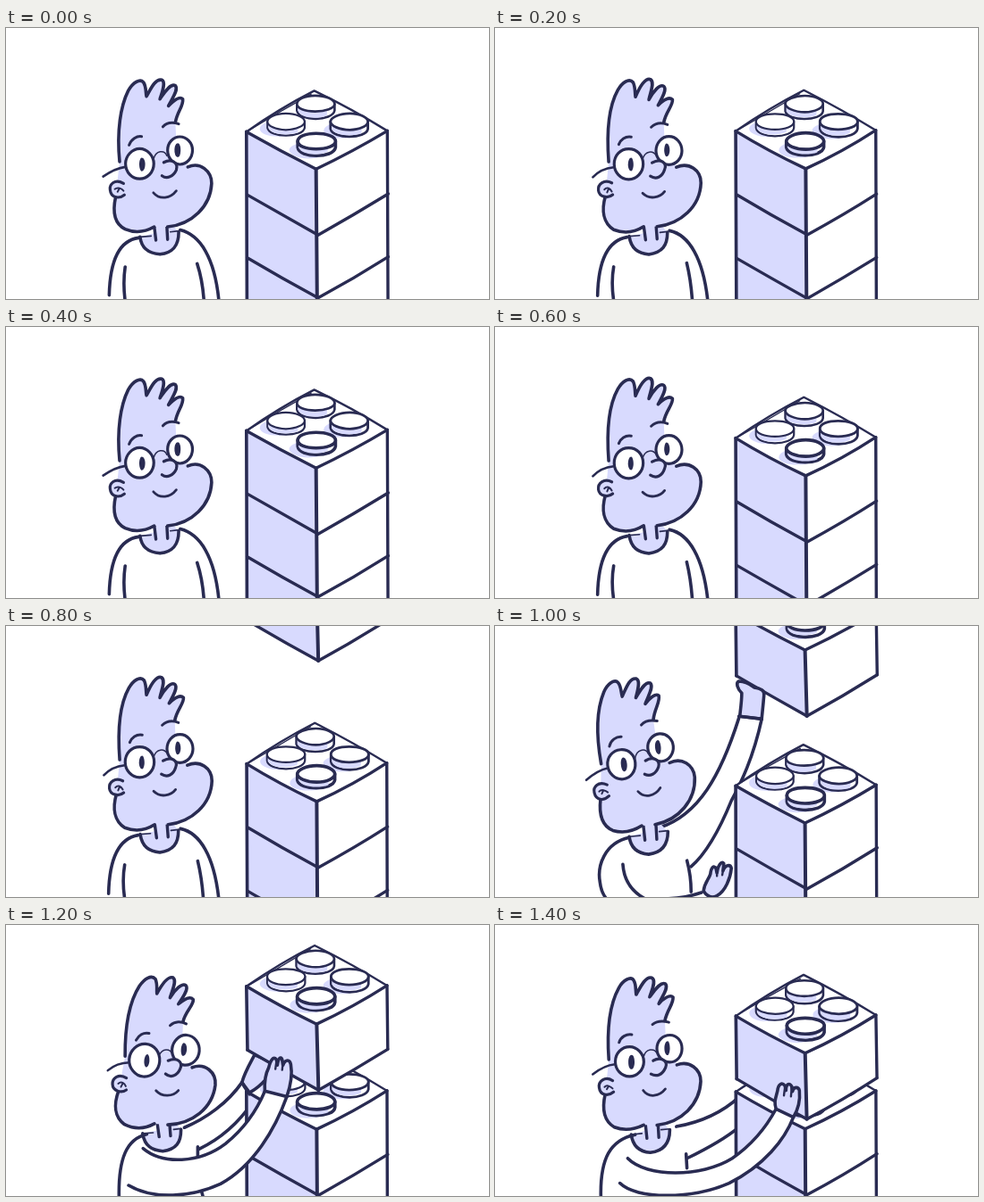
These frames come from a looping animation (540 px wide and 304 px high, 1600 ms). An HTML page with a canvas:

```html
<!DOCTYPE html>
<html lang="en">
<head>
<meta charset="utf-8">
<title>Stacking bricks</title>
<style>
  html, body { margin: 0; width: 100%; height: 100%; overflow: hidden; background: #fff; }
  canvas { display: block; width: 540px; height: 304px; }
</style>
</head>
<body>
<canvas id="stage" width="540" height="304"></canvas>
<script>
const ctx = document.getElementById('stage').getContext('2d');
const INK = '#292b52', TINT = '#d8dafe', WHITE = '#fff';
const STEP = 200, LAYER = 71;
let seed = 1;

// Hand-drawn wobble: equal coordinates move alike, so joints stay closed.
const rough = d => new Path2D(d.replace(/-?\d+(\.\d+)?/g,
  n => +n + Math.sin(n * 12.99 + seed * 78.2) * 0.4));

function fill(d, color) {
  ctx.fillStyle = color;
  ctx.fill(rough(d));
}
function line(d, width = 3.6) {
  ctx.lineWidth = width;
  ctx.stroke(rough(d));
}
function shape(d, color, width) {
  fill(d, color);
  line(d, width);
}
function oval(x, y, rx, ry) {
  const k = rx * 0.552, m = ry * 0.552;
  return `M${x - rx} ${y} C${x - rx} ${y - m} ${x - k} ${y - ry} ${x} ${y - ry}
    C${x + k} ${y - ry} ${x + rx} ${y - m} ${x + rx} ${y}
    C${x + rx} ${y + m} ${x + k} ${y + ry} ${x} ${y + ry}
    C${x - k} ${y + ry} ${x - rx} ${y + m} ${x - rx} ${y} Z`;
}
function limb(upper, lower) {
  fill(upper + ' L' + lower.slice(1) + ' Z', WHITE);
  line(upper);
  line(lower);
}
function at(x, y, draw) {
  ctx.save();
  ctx.translate(x, y);
  draw();
  ctx.restore();
}

function stud(x, y, h, width) {
  const b = y + h;
  shape(`M${x - 21} ${y} L${x - 21} ${b} C${x - 19} ${b + 12} ${x + 19} ${b + 12} ${x + 21} ${b} L${x + 21} ${y} Z`, WHITE, width);
  fill(`M${x - 20} ${y} L${x - 20} ${b} C${x - 16} ${b + 9} ${x + 4} ${b + 9} ${x + 13} ${b + 5} L${x + 14} ${y} Z`, TINT);
  shape(oval(x, y, 21, 9), WHITE, width);
}

function column(layers) {
  const h = layers * LAYER, b = h + 3;
  fill(`M345 70 L426 115 L427 ${115 + h} L349 ${158 + b} L270 ${116 + h} L269 116 Z`, WHITE);
  fill(`M269 116 L347 158 L349 ${158 + b} L270 ${116 + h} Z`, TINT);
  for (const [x, y] of [[305, 113], [376, 115], [338, 137]])
    fill(oval(x, y, 21, 9), TINT);
  line('M269 116 Q306 90 345 70 Q387 91 426 115', 2.4);
  line('M271 115 Q306 94 341 74', 1.3);
  line('M269 116 Q306 138 347 158 Q388 139 426 115', 3.4);
  line(`M269 116 L270 ${116 + h}`);
  line(`M347 158 L349 ${158 + b}`, 4);
  line(`M426 115 L427 ${115 + h}`, 3.4);
  for (let i = 1; i <= layers; i++) {
    const s = i * LAYER;
    line(`M270 ${116 + s} Q309 ${139 + s} 349 ${161 + s} Q389 ${139 + s} 427 ${115 + s}`, 3.4);
  }
  stud(346, 85, 8, 2.6);
  stud(313, 105, 7, 2.2);
  stud(384, 105, 8, 2.8);
  stud(347, 127, 7, 3.6);
}

const HAIR = `M127 150 C124 115 128 87 137 70 C142 61 150 56 154 61 C157 66 156 72 157 77
  C161 69 167 56 174 58 C179 61 174 72 172 80 C177 72 184 62 189 65 C193 69 186 79 182 87
  C187 82 194 76 198 80 C199 87 191 94 189 106`;
const CHEEK = 'M203 156 C217 150 230 160 230 174 C229 200 208 220 181 223';
const JAW = 'M166 223 C154 230 143 230 133 226 C121 219 119 205 123 189';

function head([angle, dx, dy, eye]) {
  ctx.save();
  ctx.translate(175 + dx, 222 + dy);
  ctx.rotate(angle * Math.PI / 180);
  ctx.translate(-175, -222);
  fill(`${HAIR} L190 128 L${CHEEK.slice(1)} L${JAW.slice(1)} Z`, TINT);
  line(HAIR);
  line(CHEEK);
  line(JAW);
  shape('M131 174 C122 169 115 175 116 182 C117 190 126 192 132 187', TINT, 3.2);
  line('M122 181 C125 178 129 180 131 183 M125 184 L127 180', 2);
  line('M109 167 C116 161 124 157 133 156', 2.6);
  line('M165 147 C168 137 177 137 180 143', 1.5);
  shape(oval(149.5, 152.5, 16 * eye, 17 * eye), WHITE, 3.2);
  shape(oval(194.5, 137.5, 14.2 * eye, 15.6 * eye), WHITE, 3.2);
  for (const [x, y] of [[152, 153], [192, 137]])
    fill(oval(x, y, 3.2, 7.6), INK);
  shape('M176 151 C185 146 193 151 190 159 C187 167 180 170 174 166', TINT, 3.2);
  line('M165 185 C172 193 184 191 190 183', 2.8);
  line('M138 131 C140 125 146 121 152 122', 3);
  line('M175 111 C180 106 187 106 193 108', 3);
  ctx.restore();
}

function neck(dx, dy) {
  at(dx, dy, () => {
    fill('M166 216 L181 216 L193 229 C193 246 184 253 172 254 C158 252 151 246 150 234 L166 230 Z', TINT);
    line('M150 234 C152 248 160 253 172 254 C187 252 193 244 193 229');
    line('M166 222 L168 238', 3.4);
    line('M180 222 L181 237', 3.4);
    line('M150 234 L162 233 M184 229 L193 228', 1.6);
  });
}

const idle = {
  neck: [0, 0],
  front() {
    line('M148 235 C128 238 116 258 115 300');
    line('M195 227 C217 232 233 258 238 306');
    line('M133 268 C131 280 131 292 133 306');
    line('M214 264 C218 278 220 292 221 306');
  }
};

const reach = {
  neck: [0, 2],
  back() {
    limb('M185 226 C228 212 252 168 273 103',
         'M298 104 C289 148 275 176 264 196 C251 228 237 254 219 270');
  },
  over() {
    shape(`M274 101 C275 92 276 84 276 75 C271 70 269 64 273 62 C280 62 286 66 290 69
      C297 70 302 72 301 78 C300 88 299 96 298 104 Z`, TINT);
    line('M273 101 L298 104');
  },
  front() {
    line('M150 237 C122 244 114 270 117 288 C118 296 121 302 125 306');
    line('M143 267 C144 285 152 297 168 306');
    line('M215 263 C218 276 219 288 219 298');
    line('M188 306 C204 306 220 303 231 299');
    shape(`M233 297 C234 288 239 284 241 278 C242 271 245 268 247 272 L248 277
      C249 268 253 263 256 266 L255 275 C258 267 263 267 264 272
      C263 283 258 297 248 303 C242 306 236 303 233 297 Z`, TINT);
    line('M248 271 L248 280 M256 269 L254 279', 2.4);
  }
};

const carry = {
  neck: [3, 0],
  back() {
    limb('M199 227 C224 217 248 199 264 177', 'M276 198 C260 222 240 240 215 252');
  },
  mid() {
    shape('M264 177 C267 166 272 156 278 146 L300 155 C296 170 286 180 272 188 Z', TINT);
    line('M264 177 C267 182 270 186 272 190');
  },
  front() {
    line('M157 235 C135 240 125 262 126 306');
    line('M214 249 L214 262 M218 297 L221 306');
    limb('M153 251 C175 269 216 268 245 245 C268 227 281 208 289 186',
         'M314 193 C301 228 277 270 240 290 C208 305 165 309 137 292');
    shape(`M289 186 C288 172 291 165 294 160 C296 152 299 147 302 151 L303 157
      C304 150 307 147 309 151 L310 157 C313 150 317 151 318 156 C320 167 318 180 314 193 Z`, TINT);
    line('M302 153 L301 162 M310 154 L309 163', 2.4);
  }
};

const place = {
  neck: [2, 1],
  back() {
    limb('M203 226 C230 221 255 209 274 192', 'M274 226 C258 239 238 250 215 262');
  },
  front() {
    line('M157 235 C129 241 117 262 118 306');
    line('M214 257 L215 273');
    limb('M148 262 C170 283 231 283 265 262 C289 246 304 226 314 206',
         'M334 216 C324 240 301 270 262 290 C220 308 158 308 140 290');
    shape(`M314 206 C311 198 314 193 316 186 C317 178 321 176 324 180 L325 186
      C325 178 329 176 332 181 L333 187 C334 181 339 181 340 186 C341 197 338 208 334 216 Z`, TINT);
    line('M324 182 L323 191 M332 183 L331 192', 2.4);
  }
};

// stack drop, carried brick offset, body, head [angle, dx, dy, eye size], wobble
const STILL = [0, 0, 0, 1];
const poses = [
  [0, null, idle, STILL, 1],
  [0, null, idle, STILL, 2],
  [0, null, idle, STILL, 1],
  [9, null, idle, STILL, 2],
  [39, -193, idle, STILL, 2],
  [63, -131, reach, [-5, -2, 0, 0.98], 3],
  [71, -47, carry, [4.5, 0, 1, 1.06], 4],
  [71, -14, place, [0.5, 0, 1, 1], 5]
];

function paint([drop, lift, body, face, wobble]) {
  seed = wobble;
  ctx.fillStyle = WHITE;
  ctx.fillRect(0, 0, 540, 304);
  ctx.strokeStyle = INK;
  ctx.lineCap = ctx.lineJoin = 'round';
  body.back?.();
  at(0, drop, () => column(4));
  body.mid?.();
  if (lift !== null) at(0, lift, () => column(1));
  body.over?.();
  neck(...body.neck);
  body.front();
  head(face);
}

let shown = -1;
const start = performance.now();
function tick(now) {
  const i = Math.floor(Math.max(0, now - start) / STEP) % poses.length;
  if (i !== shown) paint(poses[shown = i]);
  requestAnimationFrame(tick);
}
tick(start);
</script>
</body>
</html>
```
